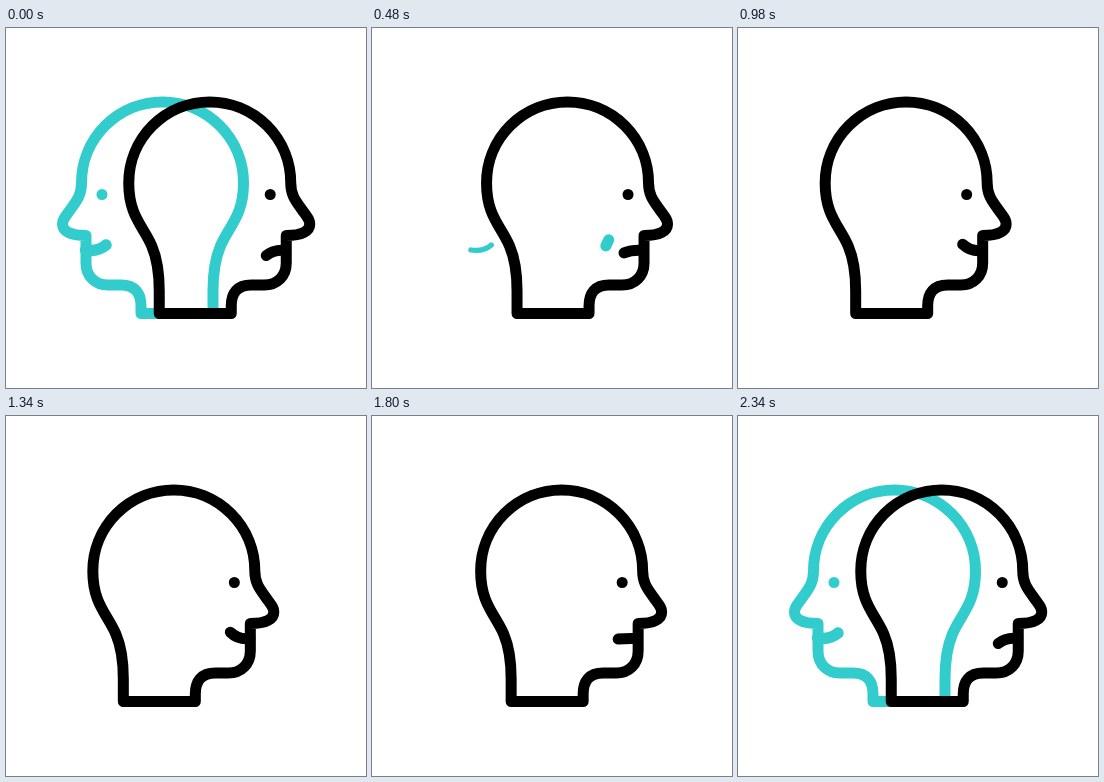
Recreate the animation shown at these times as an HTML page. Size 360 by 360 pixels, loop 2400 ms.

```html
<!DOCTYPE html>
<html>
<head>
<meta charset="utf-8">
<style>
  html, body { margin: 0; width: 100%; height: 100%; overflow: hidden; background: #fff; }
  svg { display: block; width: 100vw; height: 100vh; }
  g { stroke-width: 11; stroke-linecap: round; stroke-linejoin: round; }
  path { fill: none; }
  circle { stroke: none; }
</style>
</head>
<body>
<svg viewBox="0 0 360 360">
  <defs>
    <path id="head" pathLength="1" d="M145.5 218C137 198 122.5 188 122.5 155A81 81 0 0 1 284.5 155
      C284.5 167 289.5 173 294.5 180C300 188 303.5 191 303.5 196C303.5 203 296 207.5 280 207.5
      V235C280 248 271 257 258 257H245C231 257 225 265 225 278V285.5H153V263C153 247 151.5 232 145.5 218Z"/>
  </defs>
  <g id="teal" stroke="#33cccc" fill="#33cccc">
    <use id="outline" href="#head"/>
    <circle id="tealEye" cx="264" cy="166.5" r="5.5"/>
    <path id="tealMouth" d="M280.5 222Q268 224 260 217"/>
  </g>
  <g id="black" stroke="#000">
    <use href="#head"/>
    <circle cx="264" cy="166.5" r="5.5"/>
    <path id="mouth"/>
  </g>
</svg>
<script>
const PERIOD = 2400, TURN = 1180;
const el = id => document.getElementById(id);
const clamp = x => Math.min(1, Math.max(0, x));
const mix = (a, b, k) => a + (b - a) * k;

// cubic-bezier(.7, 0, .3, 1), solved by bisection
function ease(x) {
  let lo = 0, hi = 1, s = 0.5;
  for (let i = 0; i < 24; i++) {
    s = (lo + hi) / 2;
    const bx = 2.1 * (1 - s) ** 2 * s + 0.9 * (1 - s) * s * s + s ** 3;
    if (bx < x) lo = s; else hi = s;
  }
  return s * s * (3 - 2 * s);
}
const progress = (t, from, to) => {
  const x = clamp((t - from) / (to - from));
  return x === 0 || x === 1 ? x : ease(x);
};

function draw(now) {
  const t = now % PERIOD;
  const u = t < TURN ? t : Math.max(0, 2 * TURN - t);
  const move = progress(u, 20, TURN);
  const visible = 1 - progress(u, 75, 533);
  const features = 1 - clamp((u - 410) / 130);

  el('black').setAttribute('transform', `translate(${mix(0.25, -36.25, move)} 0)`);
  el('mouth').setAttribute('d',
    `M260 ${mix(227.5, 216, move)}Q268 ${mix(221, 224, move)} 279.5 222.5`);

  el('teal').setAttribute('transform', `translate(${mix(360, 446, move)} 0) scale(-1 1)`);
  el('outline').style.display = visible > 0 ? '' : 'none';
  el('outline').setAttribute('stroke-dasharray', visible < 1 ? `${visible} 2` : 'none');
  el('tealEye').setAttribute('r', 5.5 * features);
  el('tealMouth').setAttribute('stroke-width', 11.5 * features);

  requestAnimationFrame(draw);
}
requestAnimationFrame(draw);
</script>
</body>
</html>
```
